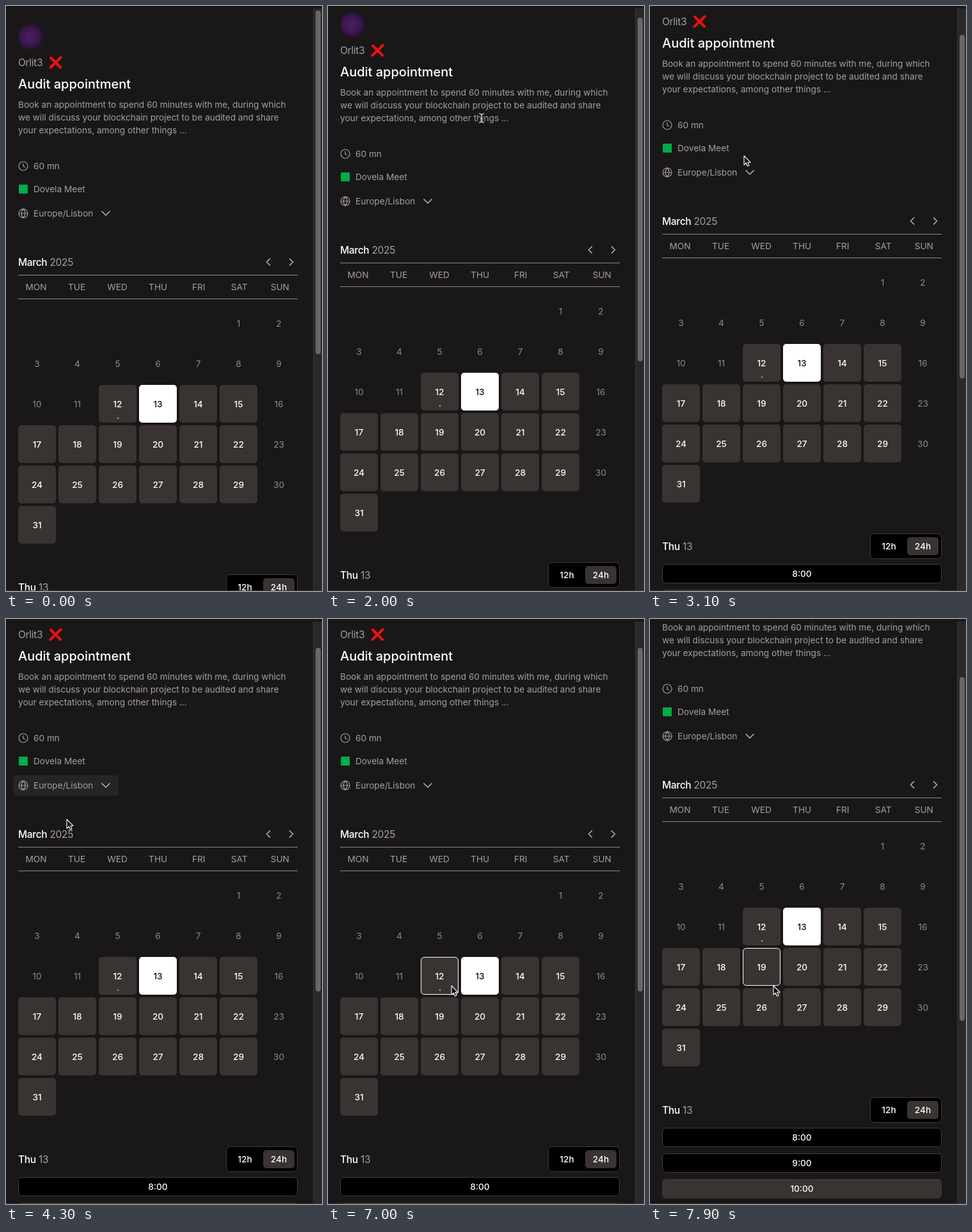
These frames come from a looping animation (494x914 px, 8 s). An HTML page:

```html
<!DOCTYPE html>
<html lang="en">
<head>
<meta charset="utf-8">
<title>Audit appointment</title>
<style>
  html, body { margin: 0; width: 100%; height: 100%; overflow: hidden; background: #1a1718; }
  svg { display: block; width: 494px; height: 914px; font-family: Inter, "Open Sans", sans-serif; }
  text { font-size: 13.65px; fill: #a3a09e; white-space: pre; }
  .mid { text-anchor: middle; }
  .on { fill: #fff; font-weight: 500; }
  .off { fill: #8f8c8a; }
  .head { font-size: 15.5px; letter-spacing: -.02em; }
  .title { font-size: 20px; }
  .icon { fill: none; stroke: #a3a09e; stroke-width: 1.2; }
  .chevron { fill: none; stroke: #b0adab; stroke-width: 1.7; stroke-linecap: round; stroke-linejoin: round; }
</style>
</head>
<body>
<svg viewBox="0 0 494 914">
  <defs>
    <radialGradient id="tone" cx=".45" cy=".5" r=".55">
      <stop offset="0" stop-color="#4a2060"/>
      <stop offset=".6" stop-color="#3b174f"/>
      <stop offset="1" stop-color="#211029"/>
    </radialGradient>
    <clipPath id="view"><path d="M0 4H480V914H0Z"/></clipPath>
  </defs>
  <rect width="494" height="914" fill="#1a1718"/>
  <g clip-path="url(#view)"><g id="page"></g></g>
  <path d="M480 4H494V914H480Z" fill="#2a2929"/>
  <path d="M480.5 4V914" stroke="#363435"/>
  <rect id="thumb" x="484" width="8" height="537" rx="4" fill="#696868"/>
  <path d="M0 913.5H494" stroke="#3c3439"/>
  <g id="cursor">
    <path id="arrow" d="M0 0V14.2L3.3 11.2L5.5 16.2L8 15.1L5.8 10.3H10.2Z" fill="#111" stroke="#fff" stroke-width="1.1" stroke-linejoin="round"/>
    <g id="beam" fill="none">
      <path d="M-4 -7Q0 -7 0 -4V4Q0 7 -4 7M4 -7Q0 -7 0 -4V4Q0 7 4 7M-2 1H2" stroke="#111" stroke-width="3"/>
      <path d="M-4 -7Q0 -7 0 -4V4Q0 7 -4 7M4 -7Q0 -7 0 -4V4Q0 7 4 7M-2 1H2" stroke="#fff" stroke-width="1.2"/>
    </g>
  </g>
</svg>
<script>
const $ = id => document.getElementById(id);
const CELL = 59, STEP = 63, LEFT = 19, TOP = 466;

// y is the middle of the capitals; size sets the drop to the baseline
const text = (x, y, s, cls = '', size = 13.65) =>
  `<text x="${x}" y="${y + size * .364}" class="${cls}">${s}</text>`;
const box = (x, y, w, h, r, fill, extra = '') =>
  `<rect x="${x}" y="${y}" width="${w}" height="${h}" rx="${r}" fill="${fill}" ${extra}/>`;
const path = (d, cls) => `<path d="${d}" class="${cls}"/>`;
const heading = (y, strong, rest) =>
  text(LEFT, y, `<tspan class="on">${strong}</tspan> ${rest}`, 'head', 15.5);

function profile() {
  return '<circle cx="39" cy="48" r="20" fill="url(#tone)"/>'
    + text(LEFT, 88, 'Orlit3', 'head', 15.5)
    + '<path d="M70 81L85 96M85.500 80.500L69.500 96" stroke="#e8120c" stroke-width="4.2" stroke-linecap="round"/>'
    + text(LEFT, 122, 'Audit appointment', 'on title', 20)
    + ['Book an appointment to spend 60 minutes with me, during which',
       'we will discuss your blockchain project to be audited and share',
       'your expectations, among other things ...']
      .map((s, i) => text(LEFT, 154 + 20 * i, s)).join('')
    + path('M34 250A7 7 0 1 1 20 250A7 7 0 1 1 34 250M27 246V250.500L30 252', 'icon')
    + text(43, 250, '60 mn')
    + box(20, 279, 14, 14, 1, '#00ac47')
    + text(43, 286, 'Dovela Meet')
    + box(11, 308, 165, 32, 5, '#262424', 'id="zone"')
    + path('M34 324A7 7 0 1 1 20 324A7 7 0 1 1 34 324M20 324H34M27 317Q21 324 27 331Q33 324 27 317', 'icon')
    + text(43, 324, 'Europe/Lisbon')
    + path('M150 321L156 327L162 321', 'chevron');
}

function calendar() {
  let s = heading(400, 'March', '2025')
    + path('M412.500 395L407.500 400L412.500 405M443.500 395L448.500 400L443.500 405', 'chevron')
    + '<path d="M19 420.500H456M19 457.500H456" stroke="#8b8785"/>';
  ['MON', 'TUE', 'WED', 'THU', 'FRI', 'SAT', 'SUN'].forEach((d, i) =>
    s += text(47 + 63.55 * i, 439, d, 'mid'));
  for (let d = 1; d <= 31; d++) {
    const col = (d + 4) % 7, row = Math.floor((d + 4) / 7);
    const x = LEFT + STEP * col, y = TOP + STEP * row;
    const open = d >= 12 && col < 6, picked = d === 13;
    if (open) s += box(x, y, CELL, CELL, 5, picked ? '#fff' : '#393432');
    s += text(x + 29.5, y + 30, d, open ? 'mid on' : 'mid off')
      .replace('<text', picked ? '<text style="fill:#111"' : '<text');
    if (d === 12) s += `<circle cx="${x + 30}" cy="${y + 52}" r="1.3" fill="#a3a09e"/>`;
  }
  return s + box(0, 0, CELL - 1, CELL - 1, 5, 'none', 'stroke="#fff" id="ring"');
}

function slots() {
  let s = heading(908, 'Thu', '13')
    + box(344.5, 888.5, 111, 39, 6, '#000', 'stroke="#3f3b3a"')
    + box(402, 894, 49, 28, 5, '#393432')
    + text(373.5, 908, '12h', 'mid on') + text(426.5, 908, '24h', 'mid on');
  for (let i = 0; i < 4; i++) {
    const y = 936 + 40 * i;
    s += box(19.5, y + .5, 436, 29, 5.5, i === 2 ? '#393432' : '#000', 'stroke="#3f3b3a"')
      + text(237.5, y + 15, `${8 + i}:00`, 'mid on');
  }
  return s;
}

$('page').innerHTML = profile() + calendar() + slots();

const scrollKeys = [[1600, 0], [2400, 38], [2800, 64], [7100, 64], [7200, 66], [7300, 70], [7600, 103], [7900, 141]];
const cursorKeys = [
  [800, 488, 330], [1200, 245, 153], [1500, 241, 175], [2600, 239, 175], [3300, 110, 258],
  [4240, 100, 268], [4300, 95, 313], [5100, 285, 500], [5500, 300, 550], [6000, 360, 560],
  [6300, 365, 620], [6840, 332, 652], [6900, 314, 637], [6940, 193, 573]
];

// Linear interpolation through [time, ...values]
function at(keys, t) {
  const i = keys.findIndex(k => k[0] > t);
  if (i === 0) return keys[0].slice(1);
  if (i < 0) return keys[keys.length - 1].slice(1);
  const a = keys[i - 1], b = keys[i], f = (t - a[0]) / (b[0] - a[0]);
  return a.slice(1).map((v, j) => v + (b[j + 1] - v) * f);
}

const show = (id, on) => $(id).setAttribute('visibility', on ? 'visible' : 'hidden');
const move = (id, x, y) => $(id).setAttribute('transform', `translate(${x} ${y})`);

function draw(t) {
  const scroll = Math.round(at(scrollKeys, t)[0]);
  const [x, y] = at(cursorKeys, t).map(Math.round);
  move('page', 0, -scroll);
  $('thumb').setAttribute('y', 7 + scroll * .594);

  // Hover reacts slightly after the pointer
  const [hx, sy] = at(cursorKeys, t - 60), hy = sy + scroll;
  show('zone', hx >= 11 && hx <= 176 && hy >= 308 && hy <= 340);
  const col = Math.floor((hx - LEFT) / STEP), row = Math.floor((hy - TOP) / STEP);
  const day = row * 7 + col - 4;
  const inside = (hx - LEFT) % STEP <= CELL && (hy - TOP) % STEP <= CELL;
  show('ring', inside && row >= 2 && col >= 0 && col < 6 && day >= 12 && day <= 31);
  move('ring', LEFT + STEP * col + .5, TOP + STEP * row + .5);

  const shown = t >= 900, overText = x < 440 && y + scroll > 145 && y + scroll < 204;
  show('arrow', shown && !overText);
  show('beam', shown && overText);
  move('cursor', x, y);
}

function tick() {
  draw(Math.floor(performance.now() % 8000 / 100) * 100);
  requestAnimationFrame(tick);
}
tick();
</script>
</body>
</html>
```
